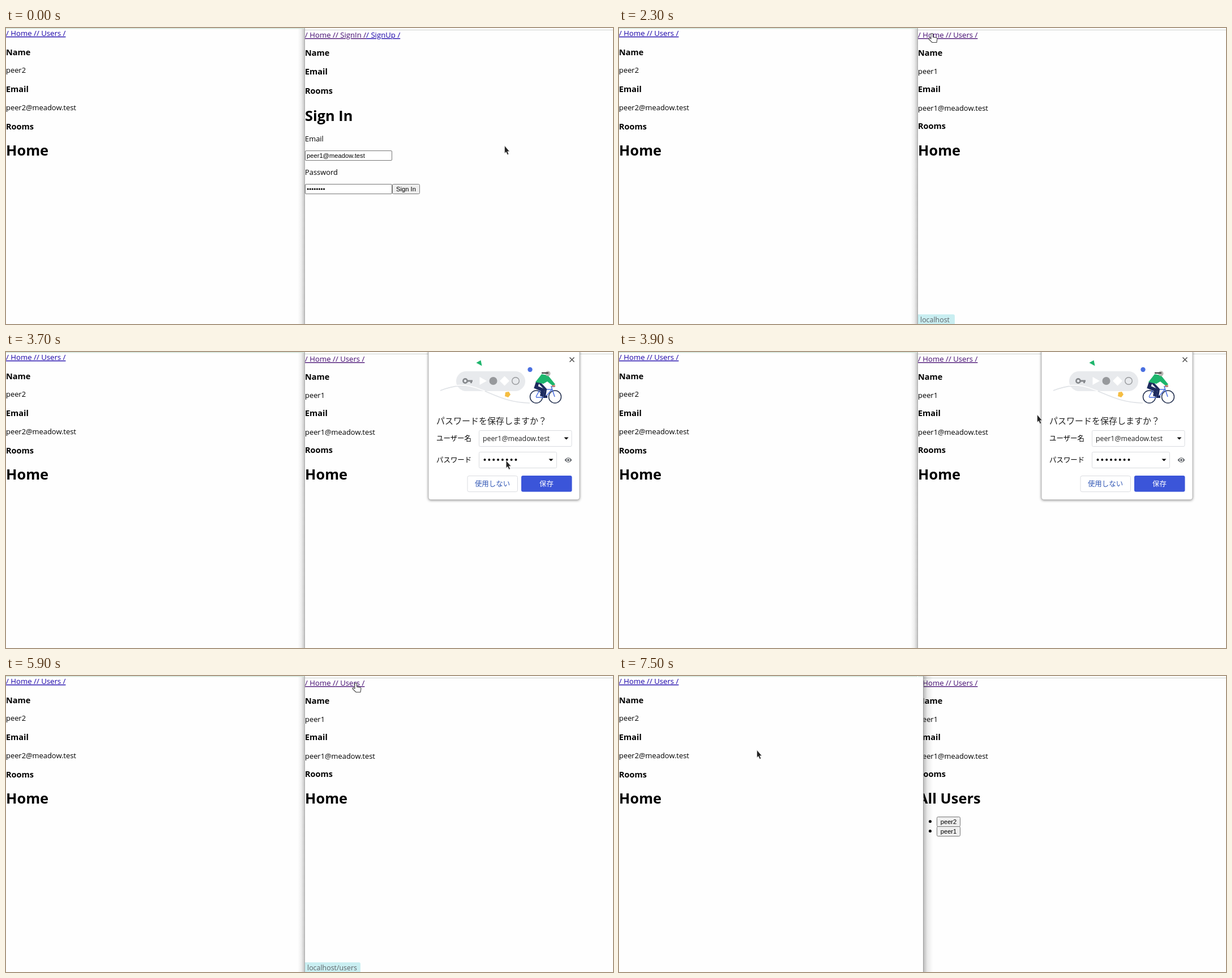
An HTML page for the animation above (8 s loop, 1072 by 522 pixels).

```html
<!DOCTYPE html>
<html lang="en">
<head>
<meta charset="utf-8">
<title>Sign in</title>
<style>
html, body { margin: 0; width: 100%; height: 100%; overflow: hidden; background: #fefefe; }
svg { display: block; }
text { font: 500 12.9px "Open Sans", "Noto Sans", sans-serif; }
.h1 { font-size: 25.4px; font-weight: 700; }
.h3 { font-size: 14.5px; font-weight: 700; }
.links { font-size: 13.2px; }
.new, .seen { fill: #1800a8; text-decoration: underline 1px; text-decoration-skip-ink: none; }
.seen { fill: #430a70; }
.ui { font: 11.2px "Liberation Sans", Arial, sans-serif; }
.jp, .title { font: 12.45px "Noto Sans CJK JP", "Noto Sans CJK", sans-serif; }
.title { font-size: 15px; fill: #222; }
.grey { fill: #5f6368; }
.mid { text-anchor: middle; }
.field { fill: #fff; stroke: #777; }
.box { fill: #fff; stroke: #dadce0; }
.line { fill: none; stroke: #e0e2e5; stroke-width: 1.3; }
.card { fill: #fff; stroke: #b9b9b9; filter: drop-shadow(0 1px 2px #0006); }
</style>
</head>
<body>
<svg id="stage" width="1072" height="522" viewBox="0 0 1072 522">
  <defs>
    <linearGradient id="toLeft">
      <stop offset="0" stop-opacity="0"/><stop offset=".55" stop-opacity=".06"/><stop offset="1" stop-opacity=".22"/>
    </linearGradient>
    <linearGradient id="toRight">
      <stop offset="0" stop-opacity=".28"/><stop offset=".35" stop-opacity=".08"/><stop offset=".8" stop-opacity="0"/>
    </linearGradient>
  </defs>
</svg>
<script>
const RIGHT = 528;
const text = (x, y, s, cls = '') => `<text x="${x}" y="${y}" class="${cls}">${s}</text>`;
const rect = (x, y, w, h, attrs, r = 0) => `<rect x="${x}" y="${y}" width="${w}" height="${h}" rx="${r}" ${attrs}/>`;
const disc = (x, y, r, attrs) => `<circle cx="${x}" cy="${y}" r="${r}" ${attrs}/>`;
const path = (d, attrs) => `<path d="${d}" ${attrs}/>`;
const group = (id, ...parts) => `<g id="${id}">${parts.join('')}</g>`;
const link = (s, cls) => `<tspan class="${cls}">/ ${s} /</tspan>`;
const links = (x, y, ...items) => text(x, y, items.join(''), 'links');
const dots = (x, y, step, r) => Array.from({ length: 8 }, (_, i) => disc(x + i * step, y, r, '')).join('');
const button = (x, y, w, s, id = '') =>
  rect(x + .5, y + .5, w - 1, 17, `id="${id}" fill="#efefef" stroke="#777"`, 2) + text(x + w / 2, y + 12.7, s, 'ui mid');
const field = y => rect(RIGHT + .5, y + .5, 153, 17, 'class="field"', 1.5);
const profile = (x, name, ys) => ['Name', name, 'Email', name + '@meadow.test', 'Rooms']
  .map((s, i) => text(x, ys[i], s, i % 2 ? '' : 'h3')).join('');
const star = (x, y, r, attrs) => path([0, 60, 120].map(a => {
  const dx = r * Math.sin(a * Math.PI / 180), dy = r * Math.cos(a * Math.PI / 180);
  return `M${x - dx} ${y - dy}L${x + dx} ${y + dy}`;
}).join(''), attrs);

const signIn = group('signIn',
  links(RIGHT, 17, link('Home', 'seen'), link('SignIn', 'seen'), link('SignUp', 'new')),
  text(RIGHT, 49, 'Name', 'h3'), text(RIGHT, 82, 'Email', 'h3'), text(RIGHT, 116, 'Rooms', 'h3'),
  text(RIGHT, 164, 'Sign In', 'h1'),
  text(RIGHT, 200, 'Email'), field(216), text(531, 228.5, 'peer1@meadow.test', 'ui'),
  text(RIGHT, 259, 'Password'), field(275), dots(533.2, 284, 4.05, 1.6),
  button(682, 275, 49, 'Sign In', 'submit'));

const account = group('account',
  links(RIGHT, 17, link('Home', 'seen'), link('Users', 'seen')),
  profile(RIGHT, 'peer1', [49, 81, 113, 146, 178]),
  group('home', text(RIGHT, 225, 'Home', 'h1')),
  group('users', text(RIGHT, 225, 'All Users', 'h1'),
    disc(549.5, 256.5, 2.5, ''), button(561, 248, 42, 'peer2'),
    disc(549.5, 273.5, 2.5, ''), button(561, 265, 42, 'peer1')));

const leak = group('leak',
  rect(615.5, -6, 373.5, 272, 'class="card"', 4),
  rect(616, 1, 372.5, 99, 'fill="#f8f8f8"'),
  path('M616 58C632 57 640 62 650 69', 'class="line" style="stroke-width:4"'),
  path('M650 69C664 80 678 80 692 69', 'fill="none" stroke="#b8bcc1" stroke-width="4"'),
  star(659, 45, 8, 'stroke="#e0e2e5" stroke-width="3"'),
  rect(709.5, 16.5, 56, 75, 'class="line"', 5),
  path('M718 28V23Q718 20 722 20H730Q732 9 738 9T745 20H753Q757 20 757 23V28Z', 'class="line"'),
  disc(738, 15, 2.5, 'class="line"'),
  path('M766 25H825Q828 25 828 28V79H766M766 82H838', 'class="line"'),
  path('M828 53C828 37 838 30 856 30', 'fill="none" stroke="#b8bcc1" stroke-width="4"'),
  path('M856 30C877 29 887 20 887 1', 'class="line" style="stroke-width:4"'),
  path('M955 57A8 7 0 0 1 971 57Z', 'fill="#dfe1e5"'),
  rect(750.5, 46.5, 54.5, 21, 'class="box"', 2),
  [762, 774, 786].map(x => star(x, 57, 4, 'stroke="#3b55d9" stroke-width="1.8"')).join(''),
  path('M795.5 52V62', 'stroke="#3b55d9" stroke-width="1.8"'),
  path('M738 39L718.5 69.5H757Z', 'fill="#d90a35" stroke="#d90a35" stroke-width="2" stroke-linejoin="round"'),
  path('M738 50V60M738 63V65.5', 'stroke="#fff" stroke-width="2.6"'),
  text(629, 130.5, 'パスワードを変更してください', 'title'),
  ['たった今使用したパスワードがデータ侵害で検出されまし', 'た。このパスワードを今すぐ変更することをおすすめしま', 'す。']
    .map((s, i) => text(629, 163.5 + i * 18.2, s, 'jp grey')).join(''),
  disc(639, 238, 5.3, 'fill="none" stroke="#555" stroke-width="1.2"'),
  path('M639 237V241M639 234.5V236', 'stroke="#555" stroke-width="1.2"'),
  rect(922, 224, 53.5, 28.5, 'fill="#fff" stroke="#3b55d9" stroke-width="1.6"', 3),
  rect(924, 226, 49.5, 24.5, 'fill="#3b55d9"', 2),
  `<text x="948.5" y="242" class="mid" style="font-size:12px;font-weight:600" fill="#fff">OK</text>`);

const save = group('save',
  rect(746, -6, 267, 266.5, 'class="card"', 4),
  path('M995.5 9.5L1003.5 17.5M1003.5 9.5L995.5 17.5', 'stroke="#555" stroke-width="1.6"'),
  rect(795, 34, 122, 35, 'fill="#e8eaed"', 17.5),
  path('M767 68C790 59 812 56 838 66S885 89 925 90', 'fill="none" stroke="#dfe2e6" stroke-width="1.6"'),
  path('M795 59Q816 57 838 66L846 69', 'fill="none" stroke="#fff" stroke-width="1.6"'),
  disc(811, 51, 3.6, 'fill="none" stroke="#85888c" stroke-width="2.6"'),
  path('M815 51H824M821.5 51V55', 'stroke="#85888c" stroke-width="2.8"'),
  path('M836.5 44L849 51L836.5 58Z', 'fill="#fff"'),
  disc(860.5, 51, 7, 'fill="#97999c"'),
  path('M880.5 42.5L889 51L880.5 59.5L872 51Z', 'fill="#fff"'),
  disc(900, 51, 6.3, 'fill="none" stroke="#97999c" stroke-width="1.4"'),
  path('M830.5 19L838.5 14.5L840.5 24.5Z', 'fill="#1db56c"'),
  disc(925.5, 31, 4.2, 'fill="#4a6fe0"'),
  path('M882 71L888 70L891 75L887 80L881 78Z', 'fill="#f5bd42"'),
  disc(936.5, 79, 11, 'fill="none" stroke="#23304f" stroke-width="1.5"'),
  disc(969.5, 79, 11, 'fill="none" stroke="#23304f" stroke-width="1.5"'),
  path('M936 79L943 66H964L952 80H936M943 66L952 80M969 79L963 61H969', 'fill="none" stroke="#4a6fe0" stroke-width="1.5"'),
  path('M939 53L936 62L948 67L946 78', 'fill="none" stroke="#1d2b5e" stroke-width="6"'),
  path('M941 53L953 66L951 79H956', 'fill="none" stroke="#1d2b5e" stroke-width="4"'),
  path('M946 39L957 41L970 57L966 60L956 52L949 56L935 53Z', 'fill="#1db56c"'),
  path('M964 60H970', 'stroke="#c98270" stroke-width="3"'),
  disc(957, 38, 4.5, 'fill="#b9b4b2"'),
  path('M946 37H958', 'stroke="#333" stroke-width="2"'),
  text(760, 126.5, 'パスワードを保存しますか？', 'title'),
  text(760, 157, 'ユーザー名', 'jp'), text(760, 195, 'パスワード', 'jp'),
  rect(835.5, 138.5, 163.5, 28, 'class="box"', 2),
  rect(835.5, 176.5, 137, 28, 'class="box"', 2),
  `<text x="842" y="156.5" style="font-size:12.3px" fill="#222">peer1@meadow.test</text>`,
  dots(845.5, 190, 7.85, 2),
  path('M985.5 150.5H993.5L989.5 154.5ZM958.5 188.5H966.5L962.5 192.5Z', ''),
  path('M986.5 190.5Q993 182 999.5 190.5Q993 199 986.5 190.5Z', 'fill="#5f6368"'),
  disc(993, 190.5, 2.6, 'fill="#5f6368" stroke="#fff" stroke-width="1.3"'),
  rect(815, 218.5, 88.5, 28, 'id="never" class="box"', 3),
  disc(856, 232, 7, 'id="ripple" fill="#b9c9f3"'),
  `<text x="859" y="236.5" class="jp mid" fill="#3157b5">使用しない</text>`,
  rect(910, 218, 89.5, 28.5, 'fill="#3b55d9"', 3),
  rect(911, 219.5, 87, 25.5, 'id="ring" fill="none" stroke="#fff"', 2),
  `<text x="954.5" y="236.5" class="jp mid" fill="#fff">保存</text>`);

const status = group('status',
  path('', 'id="statusBox" fill="#c9eef1"'),
  `<text id="url" x="532" y="518.5" class="grey" style="font-size:12.4px"></text>`);

stage.innerHTML += [
  rect(0, 0, 1072, 522, 'fill="#fefefe"'),
  rect(RIGHT, 3, 544, 1, 'fill="#cdd2cf"'),
  signIn, account, status,
  group('rightFront',
    rect(515, 0, 12, 522, 'fill="url(#toLeft)"'), rect(527, 0, 1, 522, 'fill="#a9a9a9"')),
  group('leftFront',
    rect(RIGHT, 0, 9, 522, 'fill="#fefefe"'), rect(537, 0, 22, 522, 'fill="url(#toRight)"'),
    rect(537, 0, 1, 522, 'fill="#a0a0a0"'), rect(RIGHT, 0, 9, 1.5, 'fill="#d4e6dc"')),
  rect(0, 0, 527, 1.5, 'fill="#d4e6dc"'),
  links(0, 14, link('Home', 'new'), link('Users', 'new')),
  profile(0, 'peer2', [48, 79, 113, 145, 179]),
  text(0, 225, 'Home', 'h1'),
  leak, save,
  group('cursor',
    path('M.5 -.5V13L3.2 10.5L5.5 15.5L7.8 14.5L5.7 9.7H9.3Z', 'id="arrow" fill="#222" stroke="#eee" stroke-width=".7"'),
    path('M-1 1.5Q1 -.5 2.5 1.5V7L8.5 8Q10 8.5 10 10L9 16.5H1L-5 10.5Q-5 8 -3 9L-1 10Z',
      'id="hand" fill="#fff" stroke="#444" stroke-width="1.1"'))
].join('');

// Pointer route: time, x, y
const route = [
  [0, 880, 208], [100, 880, 208], [200, 850, 216], [300, 760, 240], [400, 691, 254], [500, 691, 254],
  [600, 702, 285], [1200, 702, 285], [1300, 686, 286], [1600, 516, 286], [1700, 484, 282], [1800, 489, 228],
  [2000, 540, 40], [2100, 552, 9], [2400, 552, 9], [2700, 602, 31], [2800, 602, 31], [2900, 700, 80],
  [3100, 934, 198], [3200, 965, 214], [3300, 965, 214], [3400, 955, 232], [3600, 955, 232], [3900, 738, 111],
  [4100, 584, 26], [4200, 597, 22], [4300, 645, 55], [4600, 878, 217], [4900, 878, 217], [5100, 854, 231],
  [5300, 854, 231], [5700, 616, 22], [5800, 616, 22], [5900, 617, 12], [6100, 617, 12], [6400, 520, 120],
  [6700, 347, 159], [6800, 241, 142], [7100, 241, 142], [7200, 238, 140], [7400, 238, 140], [7500, 243, 131], [8000, 243, 131]
];

const $ = id => document.getElementById(id);
const show = (id, on) => $(id).style.display = on ? '' : 'none';

function draw(now) {
  const t = Math.floor(now % 8000 / 100) * 100;
  const within = (a, b) => t >= a && t < b;

  show('signIn', t < 2200);
  show('account', t >= 2200);
  show('home', t < 6100);
  show('users', t >= 6100);
  show('leak', within(2500, 3600));
  show('save', within(3700, 5400));
  show('rightFront', t < 7000);
  show('leftFront', t >= 7000);

  const hand = within(2100, 2500) || within(5900, 6200);
  show('hand', hand);
  show('arrow', !hand);
  show('status', hand);
  $('url').textContent = t < 3000 ? 'localhost' : 'localhost/users';
  $('statusBox').setAttribute('d', `M528 522V505H${t < 3000 ? 590 : 623}q3 0 3 3V522Z`);

  $('submit').setAttribute('fill', within(600, 1300) ? '#e0e0e0' : '#efefef');
  $('never').style.fill = within(5000, 5400) ? '#e8f1fa' : '#fff';
  show('ripple', within(5200, 5400));
  show('ring', within(5100, 5400));

  const i = route.findIndex(p => p[0] > t);
  const [t0, x0, y0] = route[i - 1], [t1, x1, y1] = route[i];
  const k = (t - t0) / (t1 - t0);
  $('cursor').setAttribute('transform', `translate(${x0 + (x1 - x0) * k} ${y0 + (y1 - y0) * k})`);
  requestAnimationFrame(draw);
}
requestAnimationFrame(draw);
</script>
</body>
</html>
```
